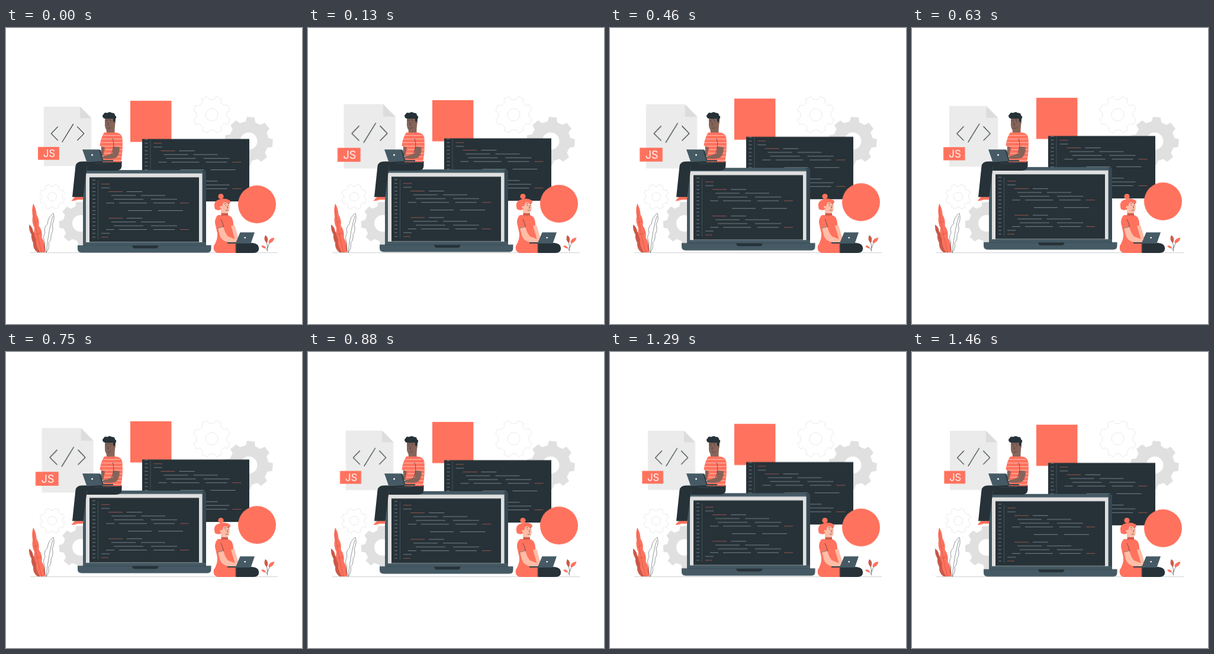
Recreate the animation shown at these times as an HTML page. Size 500 by 500 pixels, loop 1.5 s.

```html
<!DOCTYPE html>
<html lang="en">
<head>
<meta charset="utf-8">
<title>Framework illustration</title>
<style>
  html, body { margin: 0; width: 100%; height: 100%; overflow: hidden; background: #fff; }
  svg { display: block; width: 100vw; height: 100vh; }
  .float { animation: float 1.5s linear -10ms infinite; }
  .beat { transform-origin: 104px 183px; animation: beat 1.5s linear -10ms infinite; }
  @keyframes float { 50% { transform: translateY(-6px); } }
  @keyframes beat {
    0%, 20%, 40%, 60%, 100% { transform: scale(1); }
    10%, 30%, 50% { transform: scale(1.095); }
  }
  .coral { fill: #ff725e; }
  .rust { fill: #cc5b4b; }
  .dark { fill: #263238; }
  .slate { fill: #455a64; }
  .brown { fill: #876459; }
  .peach { fill: #ffbda7; }
  .line { fill: none; stroke: #263238; stroke-width: .6; stroke-linecap: round; stroke-linejoin: round; }
  .gear { fill: #e0e0e0; fill-rule: evenodd; }
  .thin { fill: none; stroke: #dcdcdc; stroke-width: .6; }
  .code { fill: none; stroke-width: .65; }
  .tag { font: 400 16.5px Inter, Roboto, sans-serif; fill: #fff; text-anchor: middle; }
</style>
</head>
<body>
<svg viewBox="0 0 500 500">
  <path d="M41 379.600H459" stroke="#b9bdbf" stroke-width=".7"/>
  <g id="gears"></g>

  <g class="beat">
    <path d="M64 133H125L144 152V233H64Z" fill="#ebebeb"/>
    <path d="M125 133V152.500H144Z" fill="#dcdcdc"/>
    <g class="line" style="stroke-width:1.1">
      <path d="M87.500 167L76.500 178.500L87.500 189.500M120.500 167L131.500 178.500L120.500 189.500M113.500 162.500L95 192.500"/>
    </g>
    <rect class="coral" x="54.300" y="200.800" width="35.600" height="21.600"/>
    <text class="tag" x="73.200" y="217.800">JS</text>
  </g>

  <g class="float">
    <rect class="coral" x="210" y="123" width="69.500" height="69.500"/>
    <rect class="dark" x="230" y="187.500" width="181" height="105.500"/>
    <g id="back" class="code"></g>
    <circle class="coral" cx="424" cy="298" r="32"/>
  </g>

  <g class="float">
    <path fill="#37474f" d="M136 240H334Q338 240 338 244V368H132V244Q132 240 136 240Z"/>
    <path class="slate" d="M134 240H328Q332.500 240 332.500 244.500V368H130V244Q130 240 134 240Z"/>
    <rect x="135" y="245.700" width="196.500" height="121.300" fill="#e0e0e0"/>
    <rect class="dark" x="141" y="252.300" width="185" height="109.200"/>
    <g id="front" class="code"></g>
    <rect class="slate" x="130" y="362" width="208" height="6"/>
    <path class="slate" d="M121 367.300H346.500V373Q346.500 379.500 340 379.500H128Q121 379.500 121 373Z"/>
    <path d="M121 367.300H346.500" stroke="#37474f" stroke-width=".6"/>
    <path class="dark" d="M213 367.500H257.500Q257 372.300 253 372.300H218Q213.500 372.300 213 367.500Z"/>
  </g>

  <g id="man">
    <path class="coral" d="M118 284L131 285L129.500 290H121Q116 292.500 110.500 292Q113 288.500 118 284Z"/>
    <path class="dark" d="M157 225H195.500V233Q195 241 185 241H136L130.500 285.500H112L117.500 233Q119 225.500 128 225.500Z"/>
    <path class="line" style="stroke:#455a64;stroke-width:.5" d="M136 241L137 234M150 228Q170 231 180 226"/>
    <path class="brown" d="M169.500 167H183.500V180H170Z"/>
    <path class="coral" d="M166 176.500H185Q195 177 196.500 186Q198 207 194 226.500H163L165 202L158.500 199Q160 185 166 176.500Z"/>
    <path fill="none" stroke="#ffe3df" stroke-width=".65" d="M163 181.500H193M161 187.500H196M160 193.500H197M159 199.500H196.500M168 205.500H196M166 211.500H195.500M165 217.500H195M164 223.500H194"/>
    <path class="brown" d="M167 151H181.500Q185 158 184 166Q183 175 176 175Q168 175 167 165Z"/>
    <path class="dark" d="M165 152.500Q161 148 165 145.500Q166 142 171 143.500Q175 140.500 179 143.500Q184 143 184 147.500Q188 150 185 153.500L184.500 160H181.500L180.500 153Q172 154 165 152.500Z"/>
    <circle class="brown" cx="182.800" cy="160.500" r="2"/>
    <path class="line" d="M169 156.500L172 155.800M175 155.500L178 156.200M171 158.700V159.500M176.500 158.700V159.500M173 160L172 164H173.800M172 169Q174.500 170.500 177 168"/>
    <path class="brown" d="M181.500 200L192 201.500Q192 215 185 219.500Q173 222.500 162 219.500Q164 215.500 169 215.500L180 212Z"/>
    <path class="brown" d="M161 199.500L167 202L164 216H160Z"/>
    <path class="line" d="M180 187Q183 194 181 204L178 213"/>
    <path class="slate" d="M129 205.300H157Q159 205.300 160 207.500L164 223.300H181V225.300H136Z"/>
    <path class="dark" d="M160 206.500L164.500 223.300H181V225.300H163L157 205.300Z" opacity=".7"/>
    <circle cx="145.500" cy="214.500" r="1.400" fill="#fff"/>
  </g>

  <g id="woman">
    <path class="dark" d="M376 363H416Q427 364 427.300 372Q427 380 418 380H380Z"/>
    <path class="peach" d="M363 304H374V318H363Z"/>
    <path class="coral" d="M358 316H375Q382 318 383.500 326L386 348L388.500 363V380H357Q349 377 351 368Q358 357 357 347L353 329Q353 320 358 316Z"/>
    <path class="rust" d="M364 312.800H375V316.800H363.500Z"/>
    <path class="peach" d="M361 292H376Q378.500 299 377.500 307Q376 313.500 369.500 313Q362 311 361 302Z"/>
    <circle class="coral" cx="363" cy="284.500" r="4.600"/>
    <path class="coral" d="M353 306Q349 293 359 290Q370 286 378.500 291.500Q380 296 376 297Q369 292 366.500 296Q365 304 362 307Q358 309 353 306Z"/>
    <circle class="peach" cx="363.200" cy="302.500" r="2"/>
    <path class="line" d="M369 297.200L371.500 296.500M374.700 296.500L376.500 297M370.800 299.500V300.300M375.300 299.500V300.300M373.500 301L374.800 304H373.200M371 307.500Q373 309 375 307.500"/>
    <path class="peach" d="M358 337L367 335Q370 347 375 352L389 357.500Q393 360 390 362H376Q364 360 361 350Z"/>
    <path class="peach" d="M380 334L386 333L390 346L393 357L387 358Z"/>
    <path class="line" d="M363 323Q366 328 367.500 336M358 338L367.500 335.500M388 365V379"/>
    <path class="slate" d="M395.500 345.300H420L413.500 364H374V362H388.500Z"/>
    <path class="dark" d="M374 362H388.500L389 364H374Z" opacity=".7"/>
    <circle cx="403.700" cy="354.300" r="1.300" fill="#fff"/>
  </g>

  <g id="plants">
    <path class="rust" d="M53 379Q45 373 46 363Q42 356 43 349Q38 341 39 332Q45 336 46 344Q52 348 51 356Q59 367 59 379Z"/>
    <path class="coral" d="M57 379Q49 367 51 357Q46 348 48 338Q43 328 45 318Q43 306 46 296.500Q51 304 51.500 315Q57 324 55.500 334Q62 343 60.500 354Q68 366 66 379Z"/>
    <path class="line" style="stroke:#a8483c;stroke-width:.45" d="M46 303Q50 342 60 379M48 329L54 326M50 349L59 346M42 336Q47 361 56 379"/>
    <path class="line" style="stroke-width:.5" d="M68 379Q62 371 66 363Q61 354 66 346Q63 337 70 331Q71 319 80 313Q83 323 78 332Q81 342 76 349Q77 358 72 363Q74 372 68 379M79 318Q72 340 68 379"/>
    <path class="line" style="stroke-width:.6" d="M441.500 377Q443 367 438.500 358M441.700 372Q443 365 449 359M441 375Q439 370 434 369.500"/>
    <path class="rust" d="M440 363Q434 357 438 350Q444 353 441.500 362Z"/>
    <path class="coral" d="M443.500 363.500Q443 355 453.500 354Q452 363 443.500 363.500Z"/>
    <path class="coral" d="M439 372Q434 373 431 368Q437 366 439 372Z"/>
  </g>
</svg>
<script>
const get = id => document.getElementById(id);

function gear(x, y, r, hole, turn, cls) {
  const teeth = 8, step = 360 / teeth, pts = [];
  for (let i = 0; i < teeth; i++) {
    for (const [k, d] of [[-.31, .82], [-.2, 1], [.2, 1], [.31, .82]]) {
      const a = ((i + k) * step + turn) * Math.PI / 180;
      pts.push((x + r * d * Math.cos(a)).toFixed(1) + ' ' + (y + r * d * Math.sin(a)).toFixed(1));
    }
  }
  const ring = `M${x - hole} ${y}a${hole} ${hole} 0 1 0 ${2 * hole} 0a${hole} ${hole} 0 1 0 ${-2 * hole} 0`;
  return `<path class="${cls}" d="M${pts.join('L')}Z${ring}Z"/>`;
}

get('gears').innerHTML =
  gear(347.5, 146.5, 31.5, 10.5, 22, 'thin') +
  gear(410, 191, 41, 14.5, 5, 'gear') +
  gear(78, 285, 21.5, 7.5, 22, 'thin') +
  gear(126, 330, 36.5, 14, -3, 'gear');

// Each row: its line number, then [start, length, accent]
const block = [
  [[13, 24, 1], [44, 26]],
  [[18, 41], [68, 41]],
  [[22, 50], [85, 44]],
  [[9, 14], [31, 47], [89, 36], [134, 15, 1]]
];
const rows = [
  [0, [[1, 14, 1]]], [1, [[1, 14]]],
  ...block.map((r, i) => [i + 2, r]),
  [7, [[46, 40], [97, 42]]],
  ...block.map((r, i) => [i + 9, r]),
  [13, [[1, 14]]], [14, [[1, 12, 1]]]
];

function code(id, x, y, count) {
  const gap = 6.4, row = n => y + n * gap;
  const dash = (a, n, w, color) =>
    `<path d="M${a} ${row(n).toFixed(1)}h${w}" stroke="${color}"/>`;
  let out = `<path d="M${x - 4.5} ${y - 6}V${row(count - 1) + 3}" stroke="#56636a"/>`;
  for (let n = -1; n < count; n++) out += dash(x - 14, n, 5, '#a5adb0');
  for (const [n, parts] of rows) {
    for (const [a, w, hot] of parts) out += dash(x + a, n, w, hot ? '#d9665a' : '#a3adb2');
  }
  get(id).innerHTML = out;
}

code('back', 248.5, 194.7, 15);
code('front', 160, 263.7, 15);
</script>
</body>
</html>
```
